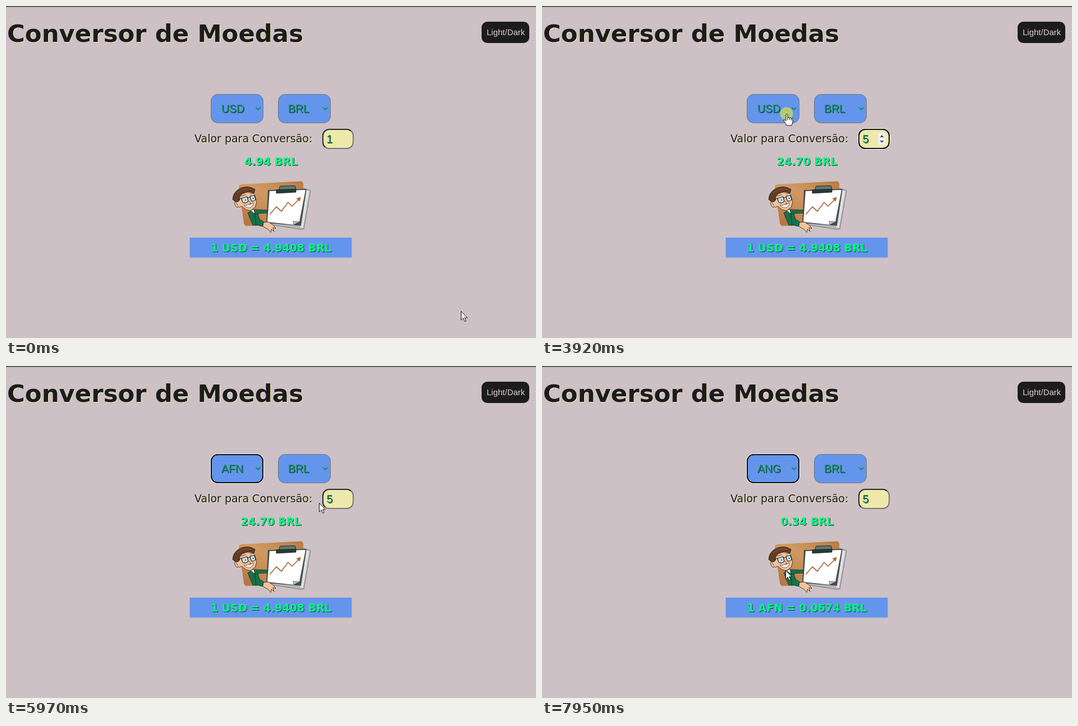
Write an HTML page that moves like this. It is 945 px wide and 592 px high and loops after 8 s.

```html
<!DOCTYPE html>
<html lang="pt-BR">
<head>
<meta charset="utf-8">
<title>Conversor de Moedas</title>
<style>
  html, body { margin: 0; width: 100%; height: 100%; overflow: hidden; background: #cdc1c5; }
  svg { display: block; width: 100vw; height: 100vh; }
  text { white-space: pre; }
  .wide { font-family: "DejaVu Sans", Verdana, sans-serif; font-size: 19px; }
  .ui { font-family: "Liberation Sans", Arial, sans-serif; font-size: 19.5px; }
  .ink { fill: #1c1c1c; filter: drop-shadow(1px 1px 0 #eee8aa); }
  .sum { fill: #00ff7f; font-weight: 700; text-anchor: middle; filter: drop-shadow(1px 1px 0 #25304a); }
  .code { fill: #0f9150; filter: drop-shadow(1px 1px 0 #1b3f4a); }
  .line { fill: none; stroke-linecap: round; stroke-linejoin: round; }
</style>
</head>
<body>
<svg viewBox="0 0 945 592">
  <defs>
    <linearGradient id="inset" x1="0" y1="0" x2="1" y2="1">
      <stop offset=".5" stop-color="#1f2a24"/><stop offset=".5" stop-color="#767676"/>
    </linearGradient>
    <linearGradient id="wood" x1="0" y1="1" x2="1" y2="0">
      <stop offset="0" stop-color="#b4713a"/><stop offset=".55" stop-color="#d09a62"/><stop offset="1" stop-color="#b97b42"/>
    </linearGradient>
    <g id="box">
      <rect x=".5" y=".5" width="93" height="51" rx="12" fill="#6495ed" stroke="#767676"/>
      <path class="line" d="M81 24.500l3.300 3.300 3.300-3.300" stroke="#0f9150" stroke-width="2"/>
    </g>
  </defs>

  <rect width="945" height="592" fill="#cdc1c5"/>
  <rect width="945" height="1.5" fill="#3a3739"/>
  <text class="wide ink" x="2" y="64" style="font-size:43.4px;font-weight:700">Conversor de Moedas</text>
  <rect x="848" y="28" width="85" height="38" rx="10" fill="#1c1c1c"/>
  <text class="ui" x="857" y="52" fill="#d8ccd0" style="font-size:15px">Light/Dark</text>

  <use href="#box" x="365" y="157"/>
  <use href="#box" x="485" y="157"/>
  <g id="fromRing" fill="none">
    <rect x="364.5" y="156.5" width="95" height="53" rx="13" stroke="#fff"/>
    <rect x="366" y="158" width="92" height="50" rx="11.5" stroke="#101010" stroke-width="2"/>
  </g>
  <text id="from" class="ui code" x="384" y="190">USD</text>
  <text class="ui code" x="503" y="190">BRL</text>

  <text class="wide ink" x="336" y="243">Valor para Conversão:</text>
  <rect x="565" y="220" width="54" height="34" rx="11" fill="#eee8aa" stroke="url(#inset)" stroke-width="2"/>
  <g id="inputRing" fill="none">
    <rect x="563.5" y="218.5" width="57" height="37" rx="13" stroke="#fff"/>
    <rect x="565" y="220" width="54" height="34" rx="11" stroke="#101010" stroke-width="2"/>
  </g>
  <text id="value" class="ui code" x="571.5" y="244">1</text>
  <rect id="caret" x="582" y="227" width="1" height="19" fill="#156b50"/>
  <g id="spinner">
    <rect x="599" y="226" width="14" height="22" fill="#efefef"/>
    <rect id="spinUp" x="599" y="226" width="14" height="11" fill="#c4c4c4"/>
    <path d="M602.5 234l3.5-4 3.5 4zM602.5 240l3.5 4 3.5-4z" fill="#505050"/>
  </g>
  <text id="total" class="wide sum" x="472.5" y="283.5"></text>

  <g stroke-linejoin="round">
    <path d="M420 318L524 312.500Q530 312 530 318L531 388 430 392Q425 392 424 387L415 324Q415 318 420 318Z" fill="url(#wood)"/>
    <path d="M530 325L543 329 531 398 524 398 464 389Z" fill="#b4b6b8" stroke="#6a6c6e" stroke-width=".8"/>
    <path d="M536 328L541 330 529.500 396 524 394Z" fill="#dfe0e1"/>
    <path d="M467 328L536 326 526 392 464 387Z" fill="#4a4f51"/>
    <path d="M470 330L534 328 523 385 513 390 466 385Z" fill="#fff"/>
    <path d="M523 385L512 384 513 390Z" fill="#c4c4c4" stroke="#333" stroke-width=".7"/>
    <path d="M487 328L488 322.500Q488 321 490 321L514 320.500Q516 320.500 516 322L517 328Z" fill="#5f7771" stroke="#1c2b28"/>
    <path d="M482 328L517 326.500V332L482 334Z" fill="#263a36" stroke="#131b19" stroke-width=".8"/>
    <path class="line" d="M471 371L482 358 491 366 503 350 510 357 523 344" stroke="#ab693e" stroke-width="1.700"/>
    <path d="M517.500 343L526 340.500 523.500 349Z" fill="#ab693e"/>
    <g stroke="#2b221c" stroke-width=".8">
      <path d="M431 369L440 363 466 364 466 369 449 370 452 380 462 387 457 393 450 391 440 391Z" fill="#16724a"/>
      <path d="M436 365L442 362 444 371Z" fill="#f4f4ee"/>
      <path d="M459 386L468 385 478 392 481 397 476 395 478 402 473 398 472 404 467 398 458 393Z" fill="#efc39b"/>
      <path d="M414 346L417 336 436 329 443 336 447 350 444 359 436 365 428 363 420 357Q410 362 408 354 407 347 414 349Z" fill="#efc39b"/>
      <path d="M404 345Q405 331 418 325 432 319 444 327L442 334Q430 329 420 336 416 340 416 347L410 350Z" fill="#633c24"/>
    </g>
    <path class="line" d="M413 333Q424 324 438 327" stroke="#80502f" stroke-width="1.500"/>
    <g fill="#cfe3ee" stroke="#232323" stroke-width="1.200">
      <path d="M420 343L430 340 432 348Q428 353 422 350ZM435 339L443 338 445 345Q441 350 437 347Z"/>
      <path class="line" d="M415 345l5-2M431 342l4-1"/>
    </g>
    <circle cx="427" cy="346" r="1.200" fill="#2d5670"/><circle cx="440.500" cy="343" r="1.200" fill="#2d5670"/>
    <path d="M424 355Q434 356 441 351 441 358 434 360 428 360 424 355Z" fill="#fff" stroke="#553022" stroke-width=".8"/>
    <path class="line" d="M433 348l4 4-3 1M411 352l3 4M420 339l8-3M435 335l6-1" stroke="#6d3d26"/>
    <path class="line" d="M443 369L446 390M449 370L443 372" stroke="#0a432c"/>
  </g>

  <rect x="327.5" y="413" width="289" height="35.500" fill="#6495ed"/>
  <text id="rate" class="wide sum" x="472.5" y="438"></text>

  <g id="list">
    <rect x="364.5" y="209.5" width="95" height="390" fill="#6495ed" stroke="#767676"/>
    <rect id="mark" x="366" width="82" height="24" fill="#1967d2"/>
    <g id="items"></g>
    <rect x="448" y="210" width="11" height="390" fill="#f1f1f1"/>
    <rect x="450" y="222" width="7" height="58" fill="#c1c1c1"/>
    <path d="M450.500 218l3-4 3 4z" fill="#606060"/>
  </g>

  <circle id="press" r="11.500" fill="#ffff00" fill-opacity=".5"/>
  <path id="arrow" d="M.5.5V16L4.200 12.600 6.800 18.500 9.200 17.400 6.700 11.800H11.500Z" fill="#fff" stroke="#111" stroke-linejoin="round"/>
  <path id="hand" d="M-1 13V1.500Q0-.5 2 1.500V7Q4 5.500 5.500 7.500 7.500 6.500 8.500 8.500 11 7.500 11 10V15Q10.500 18 9 21H0Q-1 18-5 12.500-5 10-2.500 11ZM2 7v4M5.500 8v3M8.500 9v3" fill="#fff" stroke="#111" stroke-linejoin="round"/>
</svg>
<script>
const LOOP = 8000, TOP = 210, ROW = 24;
const $ = Object.fromEntries([...document.querySelectorAll('[id]')].map(e => [e.id, e]));
const CODES = 'USD USD AED AFN ALL AMD ANG AOA ARS AUD AWG AZN BAM BBD BDT BGN'.split(' ');

// start, end, steps, points along the way
const MOVES = [
  [70, 810, 11, [811, 544], [690, 430], [547, 300], [607, 257]],
  [880, 1150, 5, [607, 257], [606, 233]],
  [3100, 3310, 4, [606, 233], [394, 197]],
  [3450, 3850, 6, [394, 197], [436, 192]],
  [4200, 4750, 9, [436, 192], [435, 235], [427, 297]],
  [5150, 5370, 4, [427, 297], [436, 303], [450, 272]],
  [5650, 6450, 13, [450, 272], [590, 236], [436, 207]],
  [6520, 6650, 3, [436, 207], [436, 195]],
  [6930, 7280, 6, [436, 195], [432, 300]],
  [7350, 7810, 6, [432, 300], [434, 364]]
];
const CLICKS = [[1480, 1620], [2100, 2160], [2490, 2620], [2960, 3030], [3920, 3990],
  [4890, 4950], [6720, 6860], [7880, 7950]];
const OPENED = [[3990, 4950], [6860, 7950]];
const AMOUNTS = [1480, 2100, 2490, 2960];

const within = (t, spans) => spans.some(([a, b]) => t >= a && t < b);
const inside = ([x, y], l, t, r, b) => x >= l && x < r && y >= t && y < b;
const show = (el, on) => el.setAttribute('display', on ? 'inline' : 'none');
const place = (el, [x, y]) => el.setAttribute('transform', `translate(${x} ${y})`);
const write = (el, s) => { if (el.textContent !== s) el.textContent = s; };

CODES.forEach((code, i) => {
  const label = document.createElementNS('http://www.w3.org/2000/svg', 'text');
  label.setAttribute('class', 'ui');
  label.setAttribute('x', 370);
  label.setAttribute('y', TOP + i * ROW + 19);
  label.textContent = code;
  $.items.append(label);
});

function pointer(t) {
  const move = MOVES.filter(m => t >= m[0]).pop();
  if (!move) return MOVES[0][3];
  const [a, b, n, ...pts] = move;
  const step = Math.min(n, 1 + Math.floor((t - a) / (b - a) * (n - 1) + 1e-6));
  const at = step / n * (pts.length - 1);
  const i = Math.min(pts.length - 2, Math.floor(at));
  return pts[i].map((v, k) => Math.round(v + (pts[i + 1][k] - v) * (at - i)));
}

function draw(t) {
  const p = pointer(t), open = within(t, OPENED), pressed = within(t, CLICKS);
  const amount = 1 + AMOUNTS.filter(a => t >= a).length;
  const from = t < 4950 ? 'USD' : t < 7950 ? 'AFN' : 'ANG';
  const [unit, rate] = t < 6030 ? ['USD', 4.9408] : ['AFN', 0.0674];
  const focused = t >= 1480 && t < 3990;
  const overInput = !open && inside(p, 564, 219, 620, 255);
  const overBox = !open && (inside(p, 365, 157, 459, 209) || inside(p, 485, 157, 579, 209));

  write($.value, String(amount));
  write($.from, from);
  write($.total, (amount * rate).toFixed(2) + ' BRL');
  write($.rate, `1 ${unit} = ${rate.toFixed(4)} BRL`);

  show($.inputRing, focused);
  show($.caret, focused && t < 3100);
  show($.spinner, focused || overInput);
  show($.spinUp, overInput && p[0] >= 599);
  show($.fromRing, (t >= 4950 && t < 6720) || t >= 7950);

  show($.list, open);
  if (open) {
    const chosen = from === 'USD' ? 0 : 3;
    const row = p[1] >= TOP ? Math.floor((p[1] - TOP) / ROW) : chosen;
    $.mark.setAttribute('y', TOP + row * ROW);
    [...$.items.children].forEach((el, i) => el.setAttribute('fill', i === row ? '#fff' : '#0b7d45'));
  }

  show($.press, pressed);
  show($.arrow, !overBox);
  show($.hand, overBox);
  [$.press, $.arrow, $.hand].forEach(el => place(el, p));
}

const start = performance.now();
function tick() {
  draw((performance.now() - start) % LOOP);
  requestAnimationFrame(tick);
}
tick();
</script>
</body>
</html>
```
